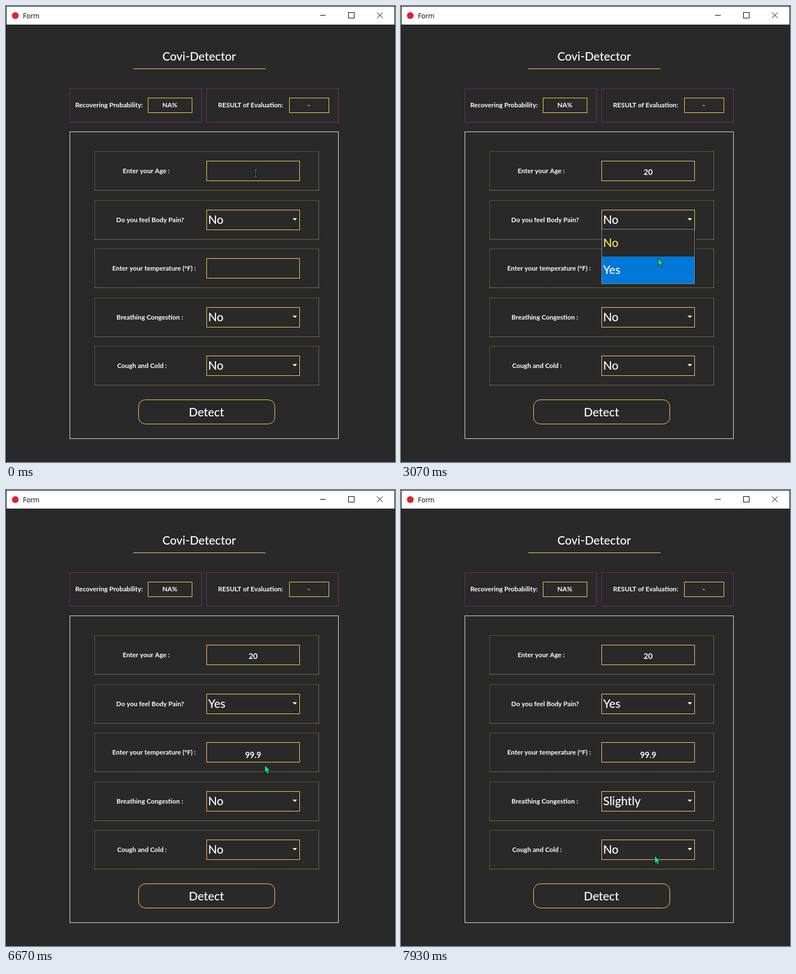
Recreate the animation shown at these times as an HTML page with a canvas. Size 691 by 810 pixels, loop 8 s.

```html
<!DOCTYPE html>
<html lang="en">
<head>
<meta charset="utf-8">
<title>Form</title>
<style>
html, body { margin: 0; width: 691px; height: 810px; overflow: hidden; background: #292929; }
canvas { display: block; }
</style>
</head>
<body>
<canvas id="stage" width="691" height="810"></canvas>
<script>
const ctx = document.getElementById('stage').getContext('2d');
const LOOP = 8000, FPS = 15;
const BG = '#292929', YELLOW = '#f2d04f', WHITE = '#fff', TEAL = '#00e0a8';
const SMALL = 'bold 11.7px Lato, sans-serif', LARGE = '500 20.8px Lato, sans-serif';
const ROWS = [293, 380, 466, 553, 639];
const LABELS = [
  ['Enter your Age :', 249], ['Do you feel Body Pain?', 256],
  ['Enter your temperature (°F) :', 263], ['Breathing Congestion :', 255.5],
  ['Cough and Cold :', 241.5]
];

// Timelines: [tick, ...values], 15 ticks per second.
const PATH = [
  [0, 443, 297], [23, 443, 297], [29, 442, 352], [32, 442, 352], [35, 455, 380],
  [41, 455, 380], [46, 456, 447], [54, 456, 461], [99, 456, 461], [102, 464, 542],
  [103, 461, 566], [108, 461, 566], [113, 458, 620], [116, 458, 620], [119, 450, 649]
];
const AGE = [[0, ''], [13, '2'], [17, '20']];
const TEMP = [[0, ''], [74, '9'], [77, '99'], [87, '99.'], [92, '99.9']];
const CARETS = [[8, 16, 0], [24, 33, 0], [58, 66, 2], [74, 82, 2], [90, 98, 2]];
const POPUPS = [
  { open: 36, close: 50, top: 396, items: ['No', 'Yes'] },
  { open: 106, close: 117, top: 569, items: ['No', 'Slightly', 'Yes'] }
];

const valueAt = (keys, tick) => keys.filter(k => k[0] <= tick).pop()[1];

function pointerAt(tick) {
  const i = PATH.findIndex(k => k[0] > tick);
  if (i < 0) return PATH[PATH.length - 1].slice(1);
  const a = PATH[i - 1], b = PATH[i], p = (tick - a[0]) / (b[0] - a[0]);
  return [1, 2].map(n => Math.round(a[n] + (b[n] - a[n]) * p));
}

function fill(x, y, w, h, color) {
  ctx.fillStyle = color;
  ctx.fillRect(x, y, w, h);
}

function box(x, y, w, h, color) {
  ctx.strokeStyle = color;
  ctx.lineWidth = 1;
  ctx.strokeRect(x + .5, y + .5, w - 1, h - 1);
}

function dottedBox(x, y, w, h, dim, bright) {
  for (let i = 0; i < w; i += 2) {
    fill(x + i, y, 1, 1, dim);
    fill(x + i, y + h - 1, 1, 1, bright);
  }
  for (let i = 0; i < h; i += 2) {
    fill(x, y + i, 1, 1, dim);
    fill(x + w - 1, y + i, 1, 1, bright);
  }
}

function text(str, x, y, font, color = WHITE, align = 'left') {
  ctx.font = font;
  ctx.fillStyle = color;
  ctx.textAlign = align;
  ctx.fillText(str, x, y);
}

function shape(points, color, outline) {
  ctx.beginPath();
  points.forEach(([x, y]) => ctx.lineTo(x, y));
  ctx.closePath();
  ctx.fillStyle = color;
  ctx.fill();
  if (outline) {
    ctx.strokeStyle = outline;
    ctx.lineWidth = 1;
    ctx.stroke();
  }
}

function line(x1, y1, x2, y2) {
  ctx.beginPath();
  ctx.moveTo(x1, y1);
  ctx.lineTo(x2, y2);
  ctx.stroke();
}

function drawWindow() {
  fill(0, 0, 691, 810, BG);
  fill(0, 0, 691, 33, WHITE);
  box(0, 0, 691, 811, '#161616');
  ctx.beginPath();
  ctx.arc(16.5, 17, 6, 0, 7);
  ctx.fillStyle = '#e5202b';
  ctx.fill();
  text('Form', 30, 21.5, '12px "Open Sans", sans-serif', '#000');
  fill(558, 16, 10, 1, '#000');
  box(608, 11, 11, 11, '#000');
  ctx.strokeStyle = '#000';
  line(659, 11.5, 669, 21.5);
  line(669, 11.5, 659, 21.5);
}

function drawHeader() {
  text('Covi-Detector', 343, 97, LARGE, WHITE, 'center');
  fill(226, 111, 235, 1, YELLOW);
  dottedBox(113, 146, 235, 61, '#9c3990', '#b53ca6');
  dottedBox(356, 146, 235, 61, '#9c3990', '#b53ca6');
  text('Recovering Probability:', 183, 180, SMALL, WHITE, 'center');
  text('RESULT of Evaluation:', 434.5, 180, SMALL, WHITE, 'center');
  box(252, 163, 79, 27, YELLOW);
  box(503, 163, 71, 27, YELLOW);
  text('NA%', 291, 180, SMALL, WHITE, 'center');
  text('-', 538, 180, SMALL, WHITE, 'center');
}

function drawCombo(y, value) {
  fill(507, y + 14, 13, 1, '#171717');
  fill(519, y - 16, 1, 31, '#1b1b1b');
  text(value, 359, y + 7, LARGE);
  shape([[509, y - 3], [517, y - 3], [513, y + 1]], WHITE);
}

function drawForm(tick) {
  box(113, 223, 478, 546, '#dcdcdc');
  const combos = { 1: tick < 50 ? 'No' : 'Yes', 3: tick < 117 ? 'No' : 'Slightly', 4: 'No' };
  ROWS.forEach((y, i) => {
    dottedBox(157, y - 35, 399, 70, '#8f823d', '#c0ac45');
    text(LABELS[i][0], LABELS[i][1], y + 4, SMALL, WHITE, 'center');
    box(356, y - 18, 166, 36, YELLOW);
    if (combos[i]) drawCombo(y, combos[i]);
  });
  text(valueAt(AGE, tick), 439, 300, 'bold 13.8px Lato, sans-serif', WHITE, 'center');
  text(valueAt(TEMP, tick), 439, 475.5, 'bold 14.5px Lato, sans-serif', WHITE, 'center');

  const caret = CARETS.find(c => tick >= c[0] && tick < c[1]);
  if (caret) {
    const typed = valueAt(caret[2] ? TEMP : AGE, tick);
    const x = typed.includes('.') ? (typed.length > 3 ? 454 : 449) : [439, 443, 448][typed.length];
    fill(x, ROWS[caret[2]] - (caret[2] ? 13 : 14), 1, caret[2] ? 19 : 20, WHITE);
  }

  ctx.beginPath();
  ctx.roundRect(235.5, 699.5, 242, 43, 12);
  ctx.strokeStyle = YELLOW;
  ctx.stroke();
  text('Detect', 356, 729, LARGE, WHITE, 'center');
}

function drawPopup({ open, top, items }, tick, pointerY) {
  const full = items.length * 48 + 2;
  const shown = Math.round(full * ([.41, .823][tick - open] || 1));
  const sliding = shown < full;
  const first = top + shown - full + 1;
  const active = sliding ? 0 : Math.max(0, Math.floor((pointerY - first) / 48));
  if (!sliding) {
    fill(522, top + 4, 2, full - 4, '#1c1c1c');
    fill(360, top + full, 164, 1, '#1c1c1c');
  }
  ctx.save();
  ctx.beginPath();
  ctx.rect(356, top, 166, shown);
  ctx.clip();
  fill(356, top, 166, shown, BG);
  items.forEach((item, i) => {
    const y = first + i * 48, on = i === active;
    if (on) fill(357, y, 164, 48, sliding ? '#f0f0f0' : '#0078d7');
    text(item, 359, y + 31, LARGE, !on ? '#ffe35c' : sliding ? '#000' : WHITE);
  });
  box(356, first - 1, 166, full, '#818790');
  ctx.restore();
}

function drawPointer(x, y, popup) {
  const overInput = !popup && x > 356 && x < 521 && [0, 2].some(i => Math.abs(y - ROWS[i]) < 18);
  if (overInput) {
    fill(x - 4, y - 8, 9, 3, '#101010');
    fill(x - 4, y + 5, 9, 3, '#101010');
    fill(x - 1, y - 7, 3, 14, '#101010');
    fill(x - 3, y - 7, 7, 1, '#08b088');
    fill(x - 3, y + 6, 7, 1, '#08b088');
    fill(x, y - 7, 1, 14, '#08b088');
    return;
  }
  const arrow = [[0, 0], [0, 14], [3, 11.5], [5.5, 16.5], [8, 15.5], [6, 10.5], [10, 10]];
  shape(arrow.map(([dx, dy]) => [x + .5 + dx, y + .5 + dy]), TEAL, '#101010');
}

function draw(now) {
  const tick = Math.floor((now % LOOP) * FPS / 1000 + .1) % (LOOP * FPS / 1000);
  const [x, y] = pointerAt(tick);
  const popup = POPUPS.find(p => tick >= p.open && tick < p.close);
  drawWindow();
  drawHeader();
  drawForm(tick);
  if (popup) drawPopup(popup, tick, y);
  drawPointer(x, y, popup);
}

let start;
function loop(now) {
  start ??= now;
  draw(now - start);
  requestAnimationFrame(loop);
}
requestAnimationFrame(loop);
</script>
</body>
</html>
```
